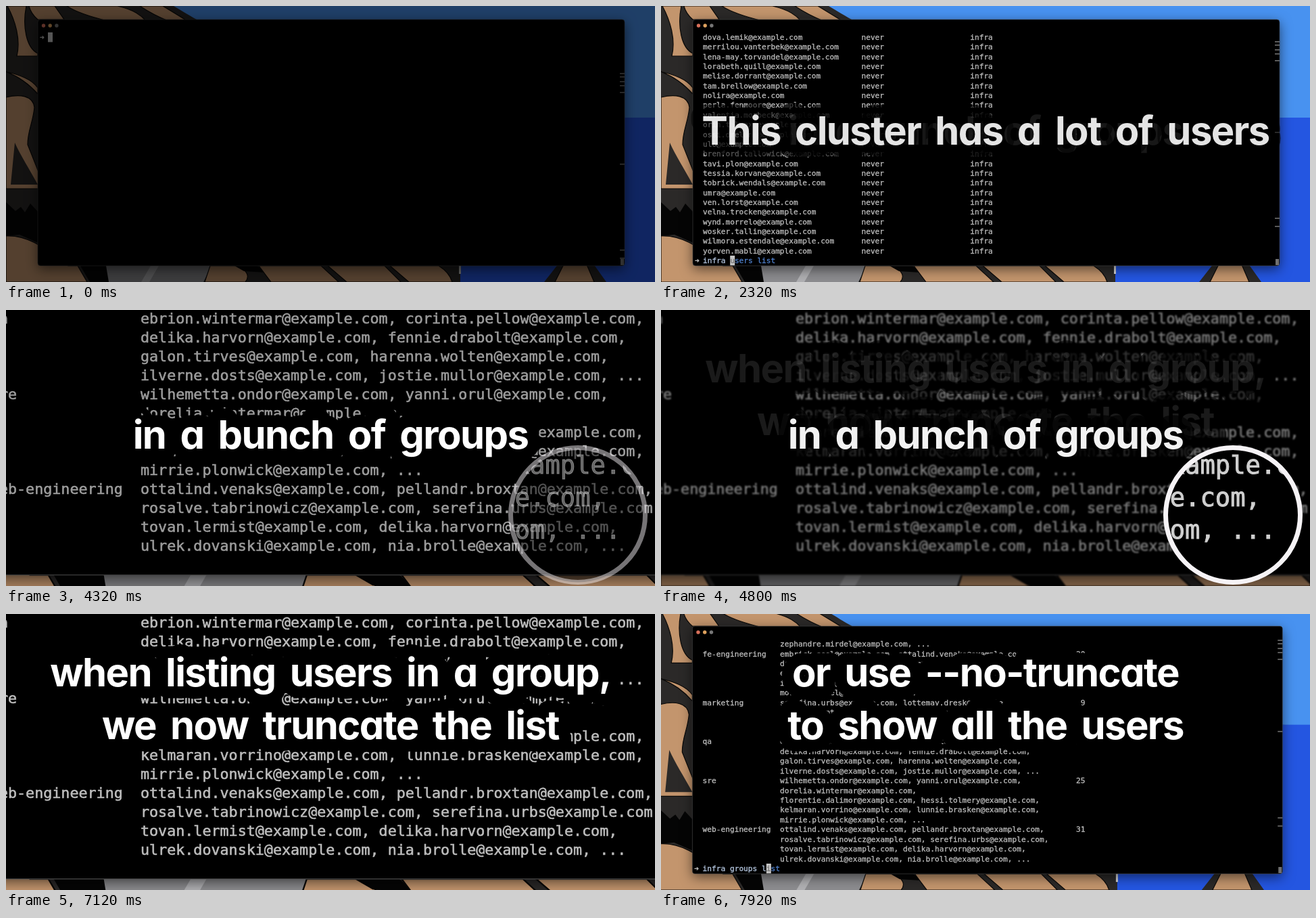
Recreate the animation shown at these times as an HTML page with a canvas. Size 960 px wide and 408 px high, loop 8 s.

```html
<!DOCTYPE html>
<html lang="en">
<head>
<meta charset="utf-8">
<title>Terminal demo</title>
<style>
  html, body { margin: 0; width: 100%; height: 100%; overflow: hidden; background: #000; }
  canvas, svg { position: absolute; left: 0; top: 0; width: 100%; height: 100%; display: block; }
  text {
    font: 700 58px Inter, "Open Sans", sans-serif;
    font-feature-settings: "cv11";
    letter-spacing: -1.6px;
    word-spacing: 9px;
    text-anchor: middle;
    fill: #fff;
    stroke: #000;
    stroke-width: 35px;
    stroke-linejoin: round;
    paint-order: stroke;
  }
</style>
</head>
<body>
<canvas id="scene" width="960" height="408"></canvas>
<svg id="titles" viewBox="0 0 960 408" preserveAspectRatio="none"></svg>
<canvas id="lens" width="960" height="408"></canvas>
<script>
const LOOP = 8000;
const CELL = 6.7, ROW = 14.35, LEFT = 62, TOP = 39;
const PIVOT = { x: 151.6, y: 376 };
const MONO = '"DejaVu Sans Mono", "Liberation Mono", monospace';
const INK = '#bdbdbd', TYPED = '#b4c6df', HINT = '#4f80cc';

const scene = document.getElementById('scene');
const ctx = scene.getContext('2d');
const lens = document.getElementById('lens').getContext('2d');

const ramp = (t, start, length) => Math.min(1, Math.max(0, (t - start) / length));
const easeOut = p => 1 - (1 - p) ** 3;
const mail = name => name + '@example.com';

const users = `dova.lemik merrilou.vanterbek lena-may.torvandel lorabeth.quill
  melise.dorrant tam.brellow nolira perla.fenmoore valentia.morbeck orin.talvex
  ossi.drelane ulo brenford.tallowick tavi.plon tessia.korvane tobrick.wendals umra
  ven.lorst velna.trocken wynd.morrelo wosker.tallin wilmora.estendale
  yorven.mabli`.split(/\s+/);

// label | members | count
const groups = `|zephandre.mirdel ...|
fe-engineering|embrick.sool ottalind.venaks|30
|dristan.follow kemmy.ostrel|
|elgar.tomblin rosalve.tabrinowicz|
|inna.welloby serefina.urbs|
|morvin.catsel ...|
marketing|serefina.urbs lottemay.dresk|9
|dorelia.wintermar kit.morleaf|
|molly.fernwix nerisa.oakbloom|
|perrin.toval du.tannol ...|
qa|ebrion.wintermar corinta.pellow|23
|delika.harvorn fennie.drabolt|
|galon.tirves harenna.wolten|
|ilverne.dosts jostie.mullor ...|
sre|wilhemetta.ondor yanni.orul|25
|dorelia.wintermar|
|florentie.dalimor hessi.tolmery|
|kelmaran.vorrino lunnie.brasken|
|mirrie.plonwick ...|
web-engineering|ottalind.venaks pellandr.broxtan|31
|rosalve.tabrinowicz serefina.urbs|
|tovan.lermist delika.harvorn|
|ulrek.dovanski nia.brolle ...|`.split('\n').map(line => {
  const [label, names, count] = line.split('|');
  const members = names.split(' ').map(n => n === '...' ? n : mail(n) + ',').join(' ');
  return { label, members, count: count.padStart(2) };
});

// Titles; later ones sit underneath during a cross-fade.
const titles = [
  { lines: ['This cluster has a lot of users'], y: 205, from: 1100, to: 2240 },
  { lines: ['in a bunch of groups'], y: 205, from: 2240, to: 4760 },
  { lines: ['when listing users in a group,', 'we now truncate the list'], y: 107, from: 4760, to: 7240 },
  { lines: ['or use --no-truncate', 'to show all the users'], y: 107, from: 7240, to: 9000 }
];
const svg = document.getElementById('titles');
for (const title of titles) {
  title.group = document.createElementNS(svg.namespaceURI, 'g');
  title.lines.forEach((line, i) => {
    const text = document.createElementNS(svg.namespaceURI, 'text');
    text.setAttribute('x', 480);
    text.setAttribute('y', title.y + 77.5 * i);
    text.textContent = line;
    title.group.append(text);
  });
  svg.prepend(title.group);
}

function showTitles(t) {
  for (const { group, from, to } of titles) {
    const a = ramp(t, from, 400), b = ramp(t, to, 400);
    group.style.display = a > 0 && b < 1 ? '' : 'none';
    group.style.fillOpacity = a * Math.sqrt(1 - b);
    group.style.strokeOpacity = a ** 0.25 * (1 - Math.sqrt(b));
  }
}

const TAN = '#c3956d', COAL = '#2b2928', BLACK = '#050505';
const art = [
  [COAL, 'M0 0H248C262 8 270 14 290 24L672 384V408H0Z'],
  [TAN, 'M2 0H30C24 30 30 62 47 70V74H16C22 50 14 22 2 0Z'],
  [TAN, 'M34 0H72L86 20H47C40 14 36 8 34 0Z'],
  [TAN, 'M90 0H165C190 6 200 14 207 22H150C125 16 105 10 90 0Z'],
  [TAN, 'M198 0H232L268 22H240C225 16 210 8 198 0Z'],
  [TAN, 'M0 97C20 102 38 108 47 121V130C34 115 18 104 0 97Z'],
  [TAN, 'M0 135C20 130 40 132 42 150C40 172 32 184 32 205L50 250V270H0Z'],
  [COAL, 'M13 202L7 264H47C34 240 22 222 13 202Z'],
  [BLACK, 'M0 290L14 303 22 297 28 305 36 292 47 304V350L20 338 0 340Z'],
  [TAN, 'M0 340C38 338 66 366 92 384H106L120 408H0Z'],
  [BLACK, 'M110 384H150L156 408H124Z'],
  ['#8c8c8f', 'M148 384H304L292 408H152Z'],
  ['#b0b0b3', 'M214 384H226L212 408H200Z'],
  [TAN, 'M302 384H344Q364 396 354 408H294Z'],
  [BLACK, 'M338 384H372L384 394 352 392Z'],
  [TAN, 'M374 384H466L492 408H392Z'],
  [TAN, 'M476 384H560L584 408H504Z'],
  [TAN, 'M568 384H640Q656 394 660 408H596Z'],
  ['#d8d8d8', 'M670 384H673V396H670Z'],
  [COAL, 'M818 380H868L888 408H796Z'],
  [TAN, 'M826 380H858L870 408H812Z']
].map(([color, d]) => [color, new Path2D(d)]);

function drawWallpaper() {
  ctx.fillStyle = '#4892f0';
  ctx.fillRect(0, 0, 960, 165);
  ctx.fillStyle = '#2456e1';
  ctx.fillRect(0, 165, 960, 243);
  ctx.strokeStyle = '#0a0908';
  ctx.lineWidth = 1.2;
  for (const [color, path] of art) {
    ctx.fillStyle = color;
    ctx.fill(path);
    if (color === TAN) ctx.stroke(path);
  }
}

function drawWindow(scroll) {
  ctx.save();
  ctx.shadowColor = 'rgba(0,0,0,.55)';
  ctx.shadowBlur = 18;
  ctx.shadowOffsetY = 5;
  ctx.fillStyle = '#000';
  ctx.beginPath();
  ctx.roundRect(47, 20, 868, 364, 4);
  ctx.fill();
  ctx.restore();
  ctx.strokeStyle = '#484848';
  ctx.lineWidth = 0.6;
  ctx.stroke();
  ['#d9705a', '#dea25e', '#777'].forEach((color, i) => {
    ctx.fillStyle = color;
    ctx.beginPath();
    ctx.arc(55.5 + 9.7 * i, 29, 2.7, 0, 7);
    ctx.fill();
  });
  ctx.fillStyle = '#707070';
  for (const y of [99, 104, 111, 117, 127, 233, 360, 372]) ctx.fillRect(908, y - scroll, 7, 1.6);
  ctx.fillRect(909, 374, 5, 9);
}

// Text with a thin outline for a slightly heavier face.
function ink(c, text, x, y, color, weight) {
  c.fillStyle = c.strokeStyle = color;
  c.lineWidth = weight;
  c.fillText(text, x, y);
  c.strokeText(text, x, y);
}

function put(text, col, row, color = INK) {
  ink(ctx, text, LEFT + col * CELL, TOP + row * ROW + 11, color, 0.3);
}

function drawPrompt(row, typed, hint) {
  const col = typed.length;
  put('➜', -1.8, row, INK);
  put(typed, 0, row, TYPED);
  put(hint, col, row, HINT);
  ctx.fillStyle = '#c6c6c6';
  ctx.fillRect(LEFT + col * CELL, TOP + row * ROW, CELL + 0.3, ROW);
  put(hint.charAt(0), col, row, '#777');
}

// Typed part of a command, and the greyed suggestion that follows it.
function typing(command, t, start, length, guess) {
  const n = Math.floor(command.length * ramp(t, start, length));
  const typed = command.slice(0, n);
  const full = guess && guess.startsWith(typed) ? guess : command;
  return [typed, n ? full.slice(n) : ''];
}

function drawTerminal(t) {
  ctx.font = `11.13px ${MONO}`;
  const usersCmd = 'infra users list', groupsCmd = 'infra groups list';
  if (t < 1040) {
    drawPrompt(0, typing(usersCmd, t, 60, 900)[0], '');
  } else if (t < 3120) {
    users.forEach((name, row) => {
      put(mail(name), 0, row);
      put('never', 35, row);
      put('infra', 59, row);
    });
    drawPrompt(23, ...typing(groupsCmd, t, 1920, 1040, usersCmd));
  } else {
    groups.forEach(({ label, members, count }, row) => {
      put(label, 0, row);
      put(members, 17, row);
      put(count, 82, row);
    });
    drawPrompt(23, ...typing(groupsCmd, t, 7190, 880));
  }
}

function drawLens(alpha) {
  lens.clearRect(0, 0, 960, 408);
  if (!alpha) return;
  lens.save();
  lens.globalAlpha = alpha;
  const rim = new Path2D();
  rim.arc(846, 303, 99.5, 0, 7);
  lens.fillStyle = '#000';
  lens.fill(rim);
  lens.save();
  lens.clip(rim);
  lens.font = `37.2px ${MONO}`;
  groups.slice(-3).forEach(({ members }, i) => ink(lens, members, -322, 242 + 48 * i, '#cfcfcf', 1));
  lens.restore();
  lens.strokeStyle = '#f6f3f6';
  lens.lineWidth = 7;
  lens.stroke(rim);
  lens.restore();
}

function draw(t) {
  const zoom = 1 + 0.95 * (easeOut(ramp(t, 3350, 880)) - easeOut(ramp(t, 7200, 880)));
  const focus = ramp(t, 4110, 440) - ramp(t, 6040, 760);
  const light = (0.43 + 0.57 * ramp(t, 0, 720)) * (1 - 0.36 * focus);

  ctx.setTransform(zoom, 0, 0, zoom, PIVOT.x * (1 - zoom), PIVOT.y * (1 - zoom));
  drawWallpaper();
  drawWindow(t < 1040 ? 0 : t < 3120 ? 47 : 59);
  drawTerminal(t);
  scene.style.filter = light < 1 ? `brightness(${light}) blur(${1.1 * focus}px)` : 'none';

  showTitles(t);
  drawLens(focus);
}

function tick() {
  draw(performance.now() % LOOP);
  requestAnimationFrame(tick);
}
tick();
</script>
</body>
</html>
```
